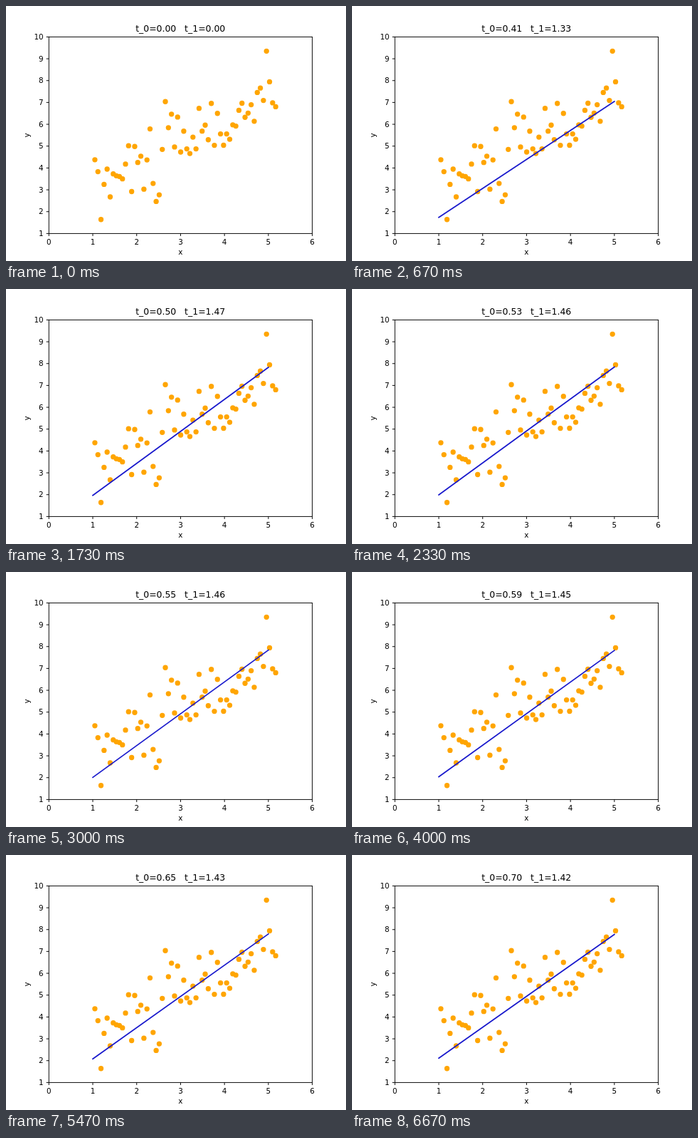
These frames come from a looping animation (478 by 358 pixels, 6.79 s). An HTML page:

```html
<!DOCTYPE html>
<html lang="en">
<head>
<meta charset="utf-8">
<title>Linear regression by gradient descent</title>
<style>
  html, body { margin: 0; width: 100%; height: 100%; overflow: hidden; background: #fff; }
  svg { display: block; width: 478px; height: 358px; }
  text { font: 10.37px "DejaVu Sans", sans-serif; text-anchor: middle; white-space: pre; }
  #title { font-size: 12.45px; }
  #yTicks text { text-anchor: end; }
  .axis { fill: none; stroke: #000; stroke-width: .95; }
  #points { fill: #ffa500; }
  #fit { stroke: #1818cc; stroke-width: 1.7; stroke-linecap: square; }
</style>
</head>
<body>
<svg viewBox="0 0 478 358">
  <clipPath id="plot"><rect x="60.3" y="43.4" width="370.3" height="276"/></clipPath>
  <g id="points"></g>
  <line id="fit" clip-path="url(#plot)"/>
  <rect class="axis" x="60.3" y="43.4" width="370.3" height="276"/>
  <g id="xTicks"></g>
  <g id="yTicks"></g>
  <text id="title" x="245.2" y="36"></text>
  <text x="245.2" y="348.7">x</text>
  <text transform="translate(32.7 181.4) rotate(-90)">y</text>
</svg>
<script>
const LOOP = 6790, FRAMES = 100, RATE = 0.0154;
const HELD = [29, 50, 61]; // frames that repeat the previous fit
const LEFT = 60.3, BOTTOM = 319.4;

const byId = id => document.getElementById(id);
const px = x => LEFT + x * 370.3 / 6;
const py = y => BOTTOM - (y - 1) * 276 / 9;

function add(parent, tag, attrs, text = '') {
  const el = document.createElementNS('http://www.w3.org/2000/svg', tag);
  for (const key in attrs) el.setAttribute(key, attrs[key]);
  el.textContent = text;
  byId(parent).append(el);
}

// Mersenne Twister giving uniform doubles in [0, 1).
function twister(seed) {
  const N = 624, state = new Uint32Array(N);
  state[0] = seed;
  for (let i = 1; i < N; i++) {
    const prev = state[i - 1];
    state[i] = Math.imul(1812433253, prev ^ (prev >>> 30)) + i;
  }
  let pos = 0;
  function next() {
    const after = (pos + 1) % N;
    const mix = (state[pos] & 0x80000000) | (state[after] & 0x7fffffff);
    let y = state[(pos + 397) % N] ^ (mix >>> 1) ^ (mix & 1 ? 0x9908b0df : 0);
    state[pos] = y;
    pos = after;
    y ^= y >>> 11;
    y ^= (y << 7) & 0x9d2c5680;
    y ^= (y << 15) & 0xefc60000;
    return (y ^ (y >>> 18)) >>> 0;
  }
  return () => {
    const high = next() >>> 5, low = next() >>> 6;
    return (high * 2 ** 26 + low) / 2 ** 53;
  };
}

// Normal deviates by the polar method, two at a time.
function normals(random, count) {
  const values = [];
  while (values.length < count) {
    const u = 2 * random() - 1, v = 2 * random() - 1;
    const r = u * u + v * v;
    if (r >= 1 || r === 0) continue;
    const scale = Math.sqrt(-2 * Math.log(r) / r);
    values.push(scale * v, scale * u);
  }
  return values;
}

// Samples scatter around y = x + 2, one every four degrees.
const samples = normals(twister(10), 60).map((noise, i) => {
  const x = (60 + 4 * i) * Math.PI / 180;
  return { x, y: x + 2 + noise };
});

function descend([t0, t1]) {
  let g0 = 0, g1 = 0;
  for (const { x, y } of samples) {
    const error = t0 + t1 * x - y;
    g0 += error;
    g1 += error * x;
  }
  const k = RATE / samples.length;
  return [t0 - k * g0, t1 - k * g1];
}

const fits = [[0, 0]];
for (let n = 1; n <= FRAMES; n++) {
  let fit = fits[n - 1];
  if (!HELD.includes(n)) fit = descend(fit);
  if (n === 1) fit = descend(fit);
  fits.push(fit);
}

const startOf = n => Math.round(n * 20 / 3) * 10;

function frameAt(time) {
  let n = Math.min(FRAMES, Math.floor(time * 3 / 200) + 1);
  while (startOf(n) > time) n--;
  return n;
}

for (const { x, y } of samples) add('points', 'circle', { cx: px(x), cy: py(y), r: 3.65 });
for (let x = 0; x <= 6; x++) {
  add('xTicks', 'path', { class: 'axis', d: `M${px(x)} ${BOTTOM}v3.63` });
  add('xTicks', 'text', { x: px(x), y: 334.5 }, x);
}
for (let y = 1; y <= 10; y++) {
  add('yTicks', 'path', { class: 'axis', d: `M${LEFT} ${py(y)}h-3.63` });
  add('yTicks', 'text', { x: 52.7, y: py(y) + 3.7 }, y);
}

let shown = -1;
function draw(n) {
  if (n === shown) return;
  shown = n;
  const [t0, t1] = fits[n];
  const ends = { x1: px(1), y1: py(t0 + t1), x2: px(5), y2: py(t0 + 5 * t1) };
  for (const key in ends) byId('fit').setAttribute(key, ends[key]);
  byId('title').textContent = `t_0=${t0.toFixed(2)}   t_1=${t1.toFixed(2)}`;
}

const start = performance.now();
function tick() {
  draw(frameAt((performance.now() - start) % LOOP));
  requestAnimationFrame(tick);
}
tick();
</script>
</body>
</html>
```
